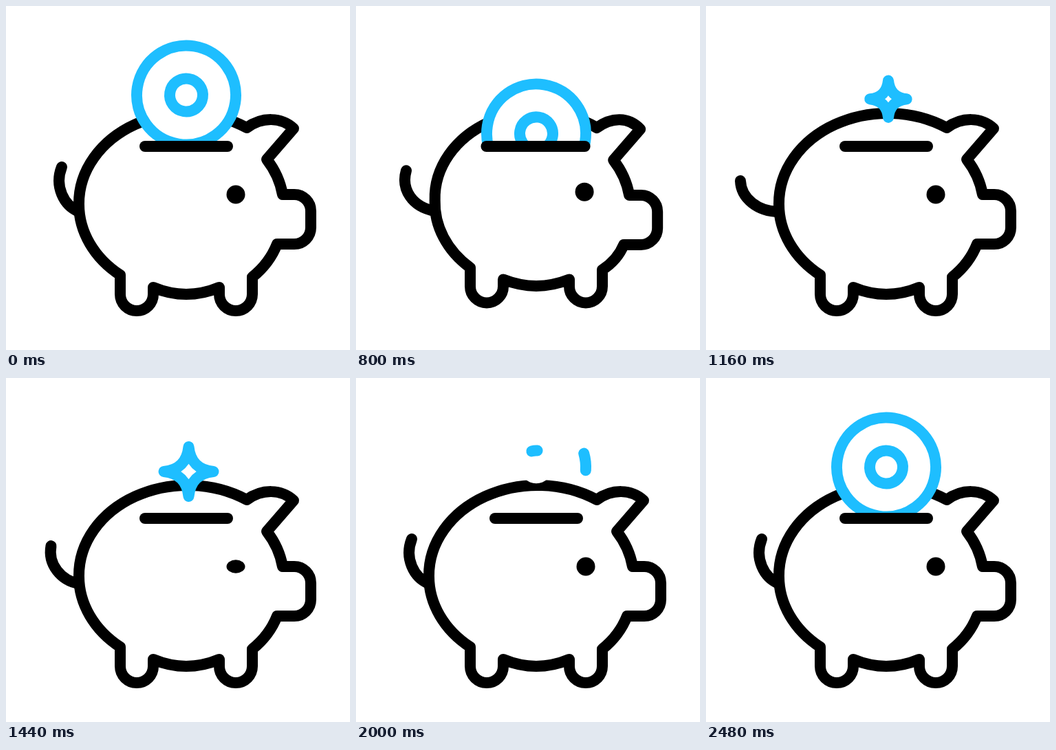
Animation, 500 px wide and 500 px high, one loop 3000 ms. Source, as an HTML page:

```html
<!DOCTYPE html>
<html lang="en">
<head>
<meta charset="utf-8">
<title>Piggy bank</title>
<style>
  html, body { margin: 0; width: 100%; height: 100%; overflow: hidden; background: #fff; }
  svg { display: block; width: 100%; height: 100%; }
  .line { fill: none; stroke: #000; stroke-width: 16; stroke-linecap: round; stroke-linejoin: round; }
  .blue { stroke: #1ebeff; }
</style>
</head>
<body>
<svg viewBox="0 0 500 500">
  <clipPath id="above"><rect width="500" height="204"/></clipPath>
  <path id="body" class="line"/>
  <path id="tail" class="line"/>
  <ellipse id="eye" rx="13.5"/>
  <g clip-path="url(#above)">
    <g id="coin">
      <circle id="disc" fill="#fff"/>
      <circle id="rim" class="line blue" r="72" pathLength="360"/>
      <circle id="core" class="line blue" r="24" pathLength="360"/>
    </g>
  </g>
  <path id="star" class="line blue"/>
  <path id="slot" class="line"/>
</svg>
<script>
const LOOP = 3000, STEP = 40;
const el = {};
for (const id of ['body', 'tail', 'eye', 'coin', 'disc', 'rim', 'core', 'star', 'slot'])
  el[id] = document.getElementById(id);

const set = (node, attrs) => {
  for (const k in attrs) node.setAttribute(k, attrs[k]);
};
const clamp = x => Math.min(1, Math.max(0, x));
const smooth = x => x * x * (3 - 2 * x);
const mix = (a, b, k) => a + (b - a) * k;
const show = (node, on) => set(node, { display: on ? 'inline' : 'none' });

// Eased value through [time, value] keys
function track(keys, t) {
  if (t <= keys[0][0]) return keys[0][1];
  for (let i = 1; i < keys.length; i++) {
    const [t0, a] = keys[i - 1], [t1, b] = keys[i];
    if (t < t1) return mix(a, b, smooth((t - t0) / (t1 - t0)));
  }
  return keys[keys.length - 1][1];
}

const SQUASH = [[640, 0], [820, 1], [980, 1], [1160, 0]];
const WAG = [[640, 0], [1120, 1], [1180, 1], [1440, .5], [1700, .72], [1940, 0]];
const BLINK = [[1400, 1], [1500, .2], [1600, 1]];
const STAR = [[920, 0], [1280, 1], [1680, 1], [2000, 0]];
const FALL = 600, GONE = 1000, REDRAW = 1920, DONE = 2480;

function drawPig(t) {
  const q = track(SQUASH, t), w = track(WAG, t);
  const m = (a, b) => mix(a, b, q).toFixed(2);
  const s = (a, b) => mix(a, b, w).toFixed(2);
  const legY = m(419, 407), hipY = m(409, 397), r = `A${m(158, 149)} ${m(131, 125)} 0 0 0`;

  set(el.body, { d: `M350 177${r} ${m(106, 115)} ${m(288, 282)}
    ${r} 166 ${m(391, 380)} V${legY} A24 24 0 0 0 214 ${legY} V${hipY}
    Q262 ${m(429, 416)} 310 ${hipY} V${legY} A24 24 0 0 0 358 ${legY} V${m(394, 383)}
    Q${m(383, 380)} ${m(374, 369)} ${m(394, 389)} ${m(346, 347)}
    H${m(419, 414)} a24 24 0 0 0 24 -24 V${m(298, 299)} a24 24 0 0 0 -24 -24 H${m(402, 397)}
    Q${m(397, 392)} ${m(246, 247)} ${m(379, 374)} ${m(223, 224)}
    L${m(418, 413)} ${m(178, 179)}
    C${m(400, 396)} 161 372 161 350 177Z` });
  set(el.tail, { d: `M${s(81, 50)} ${s(234, 254)}
    C${s(70, 51)} ${s(262, 280)} ${s(84, 76)} ${s(290, 299)} ${m(106, 115)} ${m(299, 298)}` });
  set(el.eye, { cx: m(334, 332), cy: m(274, 270), ry: 13.5 * track(BLINK, t) });
  set(el.slot, { d: `M${m(202, 189)} 204H${m(322, 333)}` });
}

function drawRing(node, from, p) {
  set(node, {
    transform: `rotate(${from + 360 * p})`,
    'stroke-dasharray': p < 1 ? `${360 * p} 360` : 'none'
  });
}

function drawCoin(t) {
  const back = t > REDRAW;
  show(el.coin, t < GONE || back);
  const drop = back ? 0 : 5 * Math.pow(Math.max(0, t - FALL) / STEP, 1.5);
  const x = back ? clamp((t - REDRAW) / (DONE - REDRAW)) : 1;
  const p = smooth(x);
  set(el.coin, { transform: `translate(262 ${129.5 + drop})` });
  set(el.disc, { r: 72 * (1 - Math.pow(1 - x, 2.6)) });
  drawRing(el.rim, -36, p);
  drawRing(el.core, -126, p);
}

function drawStar(t) {
  const k = track(STAR, t), a = 36 * k, c = 3.4 * k;
  show(el.star, k > 0);
  set(el.star, {
    d: `M0 ${-a}Q${c} ${-c} ${a} 0Q${c} ${c} 0 ${a}Q${-c} ${c} ${-a} 0Q${-c} ${-c} 0 ${-a}Z`,
    transform: `translate(${263.5 + 2 * k} ${133 + 3 * k})`,
    opacity: Math.min(clamp((t - 920) / 80), clamp((2000 - t) / 80))
  });
}

function draw(now) {
  const t = Math.floor((now % LOOP) / STEP) * STEP;
  drawPig(t);
  drawCoin(t);
  drawStar(t);
}

let start = null;
function tick(now) {
  if (start === null) start = now;
  draw(now - start);
  requestAnimationFrame(tick);
}
draw(0);
requestAnimationFrame(tick);
</script>
</body>
</html>
```
